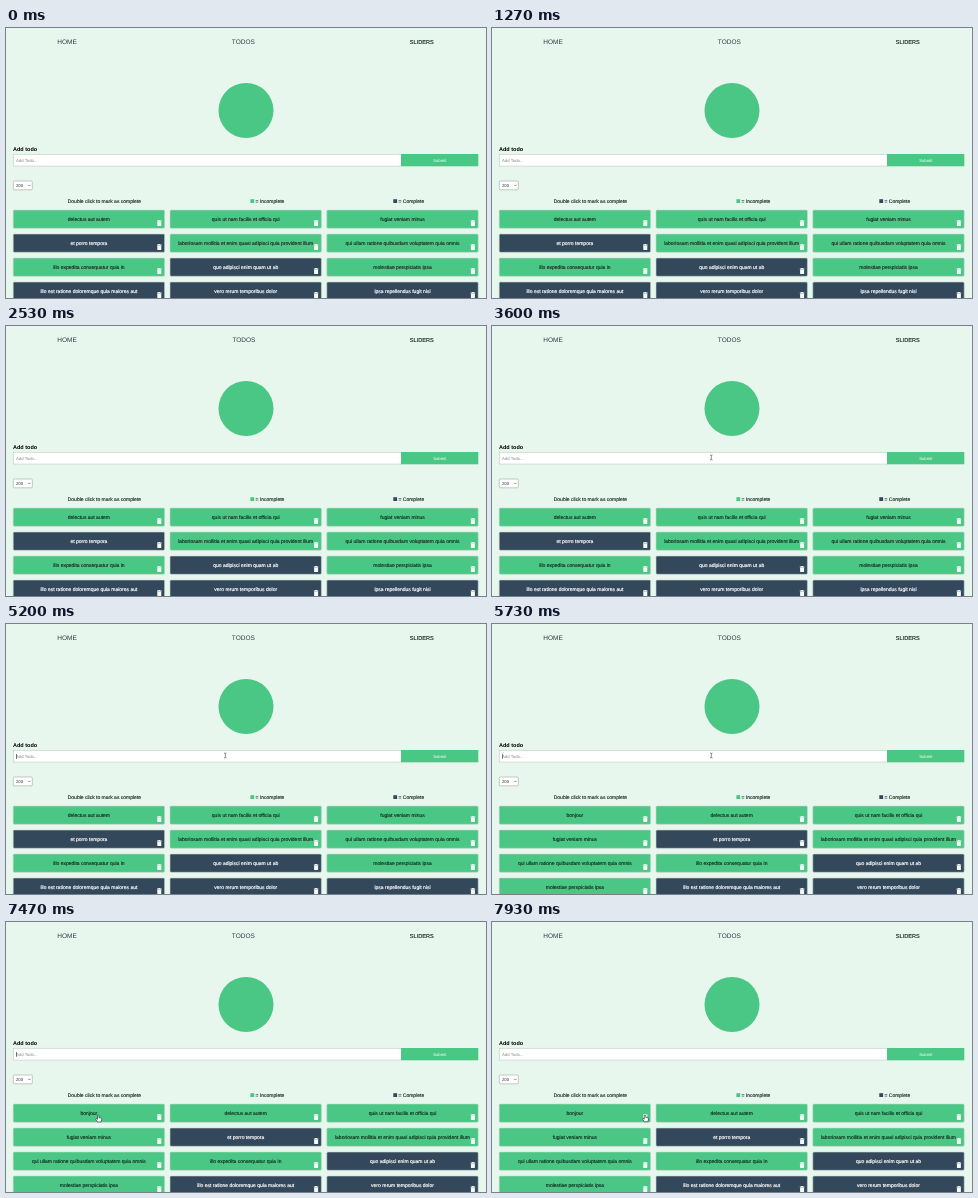
Recreate the animation shown at these times as an HTML page. Size 480 by 270 pixels, loop 8 s.

```html
<!DOCTYPE html>
<html lang="en">
<head>
<meta charset="utf-8">
<title>Todos</title>
<style>
html, body { margin: 0; width: 100%; height: 100%; overflow: hidden; background: #e8f7ee; }
svg { display: block; width: 480px; height: 270px; }
text { font-family: "Liberation Sans", Arial, sans-serif; font-size: 5px; text-rendering: geometricPrecision; white-space: pre; }
.mid { text-anchor: middle; }
.ink { fill: #14281f; stroke: #14281f; stroke-width: .13; }
.light { fill: #fff; stroke: #fff; stroke-width: .18; }
.nav { font-size: 6.5px; fill: #2c3a40; }
.small { font-size: 4.25px; }
</style>
</head>
<body>
<svg id="stage" viewBox="0 0 480 270">
  <rect width="480" height="270" fill="#e8f7ee"/>
  <text class="nav mid" x="61" y="16.3">HOME</text>
  <text class="nav mid" id="todos" x="237.3" y="16.3">TODOS</text>
  <text class="ink mid" x="415.8" y="16.1" style="font-size:5.6px">SLIDERS</text>

  <circle cx="240" cy="82.5" r="27.5" fill="#4ac785"/>

  <text x="7" y="123.3" font-weight="bold" style="font-size:5.5px">Add todo</text>
  <rect x="7.25" y="126.25" width="388" height="11.8" fill="#fff" stroke="#bcc8c2" stroke-width=".6"/>
  <text class="small" id="entry" x="10" y="133.7"></text>
  <rect id="caret" y="130" width=".6" height="4.8" fill="#222"/>
  <rect x="395" y="126" width="77.3" height="12.3" fill="#4ac785"/>
  <text class="small mid" x="433.8" y="133.7" fill="#fff">Submit</text>

  <rect x="7.3" y="153" width="19" height="8.8" rx=".8" fill="#fff" stroke="#8b9690" stroke-width=".5"/>
  <text class="small" x="10" y="158.9" fill="#333">200</text>
  <path d="M22.2 156.8l1.2 1.2 1.2-1.2" fill="none" stroke="#222" stroke-width=".5"/>

  <text class="ink mid" x="98.4" y="174.7">Double click to mark as complete</text>
  <rect x="244.4" y="171.2" width="3.8" height="3.8" fill="#4ac785"/>
  <text class="ink" x="249.6" y="174.7">= Incomplete</text>
  <rect x="387.3" y="171.2" width="3.8" height="3.8" fill="#34485c"/>
  <text class="ink" x="392.5" y="174.7">= Complete</text>

  <g id="before"></g>
  <g id="after"></g>

  <path id="beam" d="M-1.2-2.5Q0-2.5 0-1.8Q0-2.5 1.2-2.5M0-1.8V1.8M-1.2 2.5Q0 2.5 0 1.8Q0 2.5 1.2 2.5" fill="none" stroke="#444" stroke-width=".6"/>
  <path id="arrow" d="M0 0V6.2L1.5 4.9L2.5 7L3.5 6.5L2.5 4.5H4.4Z" fill="#fff" stroke="#111" stroke-width=".5"/>
  <path id="hand" d="M-.7 .5Q0-.5 .7 .5V2.6L3 3.1Q3.7 3.3 3.5 4.2L2.9 7H-.6L-2.3 4.4Q-2.3 3.5-1.4 3.7L-.7 4.3Z" fill="#fff" stroke="#111" stroke-width=".55"/>
</svg>
<script>
const LOOP = 8000;
const $ = id => document.getElementById(id);

// A leading "*" marks a completed todo.
const todos = [
  "delectus aut autem", "quis ut nam facilis et officia qui", "fugiat veniam minus",
  "*et porro tempora", "laboriosam mollitia et enim quasi adipisci quia provident illum",
  "qui ullam ratione quibusdam voluptatem quia omnis",
  "illo expedita consequatur quia in", "*quo adipisci enim quam ut ab", "molestiae perspiciatis ipsa",
  "*illo est ratione doloremque quia maiores aut", "*vero rerum temporibus dolor", "*ipsa repellendus fugit nisi"
];

function add(parent, tag, attrs, label) {
  const el = document.createElementNS("http://www.w3.org/2000/svg", tag);
  for (const key in attrs) el.setAttribute(key, attrs[key]);
  if (label) el.textContent = label;
  parent.appendChild(el);
}

function fillList(group, items) {
  items.slice(0, 12).forEach((item, i) => {
    const x = 7.2 + (i % 3) * 156.8, y = 182 + Math.floor(i / 3) * 24;
    const done = item[0] === "*";
    add(group, "rect", { x, y, width: 151.4, height: 18.3, rx: 1.2,
      fill: done ? "#34485c" : "#4ac785", stroke: "#c3d5cc", "stroke-width": .6 });
    add(group, "text", { x: x + 75.7, y: y + 11, class: "mid " + (done ? "light" : "ink") },
      item.replace("*", ""));
    add(group, "path", { fill: "#f4fbf7",
      d: `M${x + 143.8} ${y + 10.6}h1.2l.4-.5h1.4l.4.5h1.2v.8h-4.6zM${x + 144.1} ${y + 11.8}h4v3.6q0 .6-.6.6h-2.8q-.6 0-.6-.6z` });
  });
}
fillList($("before"), todos);
fillList($("after"), ["bonjour", ...todos]);

const show = (id, on) => $(id).setAttribute("visibility", on ? "visible" : "hidden");

// Eased value through [time, value] keys.
function track(keys, t) {
  let [t0, v0] = keys[0];
  for (const [t1, v1] of keys) {
    if (t < t1) {
      const p = Math.max(0, (t - t0) / (t1 - t0 || 1));
      return v0 + (v1 - v0) * p * p * (3 - 2 * p);
    }
    [t0, v0] = [t1, v1];
  }
  return v0;
}

const navShift = [[1670, 0], [1870, 1.8], [2200, 1.8], [2530, .6], [2670, .6], [2870, 0]];
const cursorX = [[6000, 219.3], [6600, 92.3], [7130, 92.3], [7330, 91.5], [7440, 91.5], [7930, 153]];
const cursorY = [[6000, 131.5], [6600, 189.3], [7130, 189.3], [7330, 193], [7440, 193], [7930, 192.8]];
const typing = [[4000, "b"], [4200, "bo"], [4670, "bon"], [4870, "bonjo"], [4930, "bonjour"], [5130, ""]];

function caretOn(t) {
  if (t < 3130) return false;
  if (t < 4000) return t < 3600;
  if (t < 5200) return true;
  return Math.floor((t - 5200) / 533) % 2 === 0;
}

function draw(t) {
  $("todos").setAttribute("x", 237.3 + track(navShift, t));

  let typed = "";
  for (const [at, word] of typing) if (t >= at) typed = word;
  const entry = $("entry");
  entry.textContent = typed || "Add Todo...";
  entry.setAttribute("fill", typed ? "#222" : "#858b88");
  $("caret").setAttribute("x", 10 + (typed ? entry.getComputedTextLength() : 0));
  show("caret", caretOn(t));

  show("before", t < 5730);
  show("after", t >= 5730);

  const x = track(cursorX, t), y = track(cursorY, t);
  const shape = t < 3130 ? "" : y < 138 ? "beam" : y < 182 ? "arrow" : "hand";
  for (const id of ["beam", "arrow", "hand"]) {
    show(id, id === shape);
    $(id).setAttribute("transform", `translate(${x} ${y})`);
  }
}

const start = performance.now();
function tick() {
  draw((performance.now() - start) % LOOP);
  requestAnimationFrame(tick);
}
tick();
</script>
</body>
</html>
```
